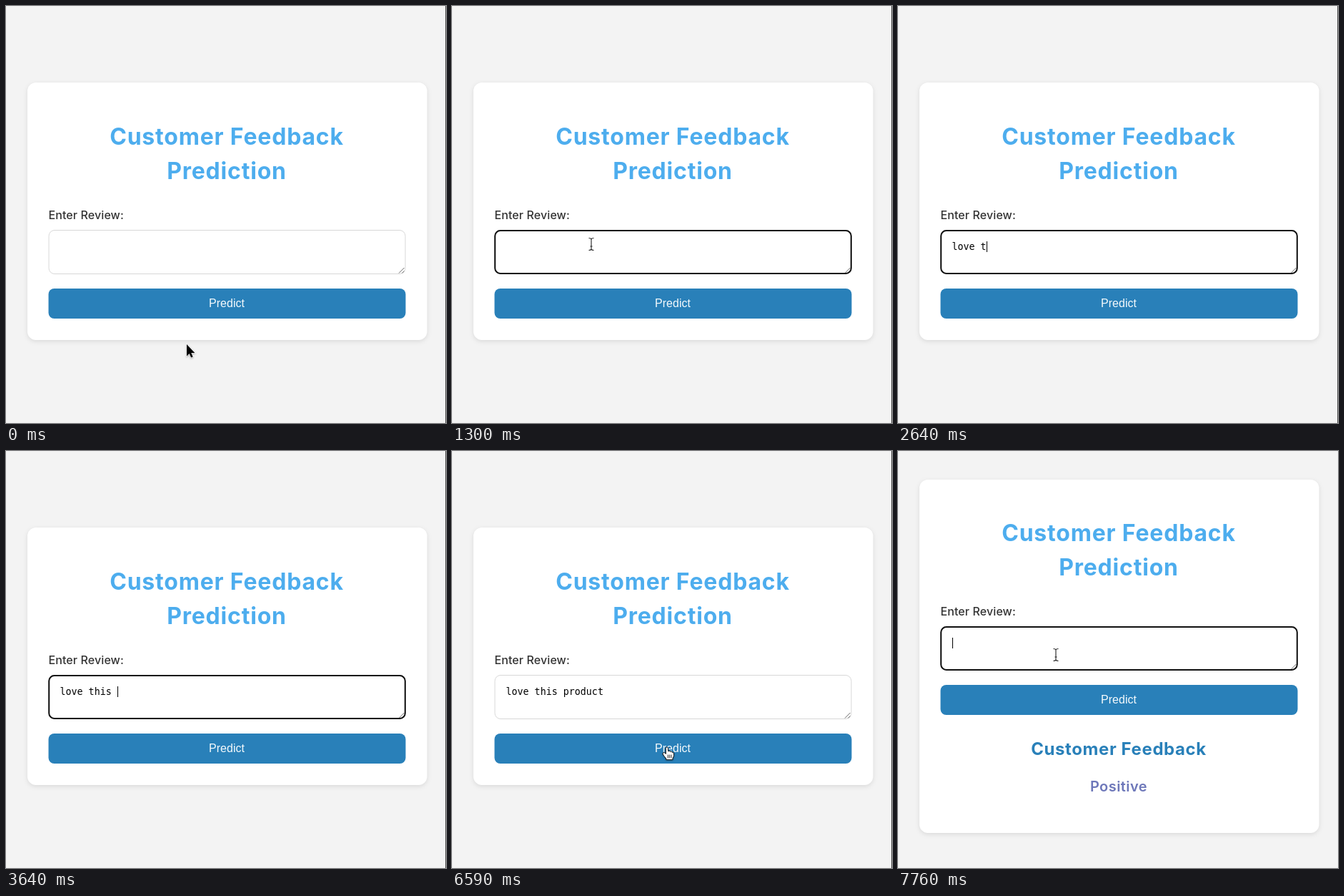
These frames come from a looping animation (616 px wide and 583 px high, 8000 ms). An HTML page:

```html
<!DOCTYPE html>
<html lang="en">
<head>
<meta charset="utf-8">
<title>Feedback form</title>
<style>
  html, body { margin: 0; width: 100%; height: 100%; overflow: hidden; background: #f3f3f3; }
  svg { display: block; width: 616px; height: 583px; }
  .head { font-family: Poppins, Inter, sans-serif; font-weight: 700; text-anchor: middle; }
  .title { font-size: 32px; letter-spacing: .8px; fill: #4dadee; }
  .sub { font-size: 24px; letter-spacing: .6px; fill: #2980b9; }
  .mood { font-size: 20px; font-weight: 600; letter-spacing: .45px; fill: #6d77b9; }
  .label { font: 500 16px Poppins, Inter, sans-serif; letter-spacing: .1px; fill: #333; }
  .btn { font: 16px "Liberation Sans", Arial, sans-serif; text-anchor: middle; fill: #f4f9fc; }
  .mono { font: 13.333px "DejaVu Sans Mono", monospace; fill: #000; white-space: pre; }
  #card { fill: #fff; filter: drop-shadow(0 2px 3px rgba(0, 0, 0, .1)); }
  .soft { filter: drop-shadow(0 1px 1px rgba(0, 0, 0, .3)); }
</style>
</head>
<body>
<svg viewBox="0 0 616 583">
  <rect width="616" height="583" fill="#f3f3f3"/>
  <rect id="edge" x="615" width="1" height="583" fill="#555"/>
  <rect id="card" x="30" y="107" width="559.5" height="360" rx="12"/>
  <g id="form">
    <text class="head title" x="309" y="194">Customer Feedback</text>
    <text class="head title" x="309" y="242">Prediction</text>
    <text class="label" x="59.5" y="298">Enter Review:</text>
    <rect id="field" x="60" y="313.5" width="499" height="61" rx="8" fill="#fff" stroke="#d8d8d8"/>
    <path d="M550 373.5l7.5-7.5M554.5 373.5l3-3" stroke="#666" fill="none"/>
    <rect id="ring" x="60.2" y="314" width="498.6" height="60" rx="7.5" fill="none" stroke="#101010" stroke-width="2"/>
    <text id="typed" class="mono" x="75.5" y="341"></text>
    <rect id="caret" y="329" width="1" height="15" fill="#000"/>
    <rect x="59.5" y="395" width="500" height="42" rx="8" fill="#2980b9"/>
    <text class="btn" x="309" y="421">Predict</text>
  </g>
  <g id="result">
    <text class="head sub" x="309" y="425">Customer Feedback</text>
    <text class="head mood" x="309" y="476">Positive</text>
  </g>
  <g id="mouse">
    <path id="arrow" class="soft" d="M0 0V16.4L3.7 12.9 6.1 18.6 8.7 17.5 6.3 11.9H11.4Z"
      fill="#000" stroke="#fff" stroke-width="1.2" paint-order="stroke"/>
    <g id="beam" fill="none">
      <path d="M-3.5-8.5Q-.5-8.5 0-7Q.5-8.5 3.5-8.5M0-7V7M-3.5 8.5Q-.5 8.5 0 7Q.5 8.5 3.5 8.5M-1.5 3H1.5" stroke="#fff" stroke-width="2.6"/>
      <path d="M-3.5-8.5Q-.5-8.5 0-7Q.5-8.5 3.5-8.5M0-7V7M-3.5 8.5Q-.5 8.5 0 7Q.5 8.5 3.5 8.5M-1.5 3H1.5" stroke="#222" stroke-width="1.1"/>
    </g>
    <g id="hand" class="soft" stroke="#111" stroke-linejoin="round" stroke-linecap="round">
      <path d="M-1.7 9V1.4Q-1.6 0 -.2 0Q1.2 0 1.4 1.4L1.8 5.8Q3.6 4.5 4.6 6.4Q6.2 5.4 7.1 7.2Q9.5 6.6 9.6 9V11.5Q9.2 14 8 15.5V17.7H-1.2V16Q-4.3 12.5 -5.8 10Q-6.5 8.2 -4.9 7.6Q-3.3 7.3 -1.7 9Z" fill="#fff"/>
      <path d="M1.4 11V15M3.7 11V15M6 11V15" fill="none" stroke-width=".9"/>
    </g>
  </g>
</svg>
<script>
const LOOP = 8000, LOAD = 6770, SHIFT = -68, CHAR = 8.027;
const REVIEW = 'love this product';
const keyTimes = [1550, 1790, 2040, 2140, 2290, 2640, 2950, 3130, 3460,
  3640, 4000, 4200, 4310, 4710, 4800, 4900, 5130];

// [time, cursor, x, y]
const moves = [
  [0, 'arrow', 253, 473], [110, 'arrow', 250, 464], [200, 'arrow', 240, 440],
  [290, 'hand', 226, 405], [390, 'beam', 208, 362], [480, 'beam', 198, 340],
  [570, 'beam', 195, 333], [2290, '', 195, 333],
  [6090, 'beam', 202, 338], [6190, 'beam', 236, 360], [6290, 'arrow', 274, 386],
  [6390, 'hand', 296, 409], [6480, 'hand', 301, 414],
  [LOAD, 'arrow', 301, 414], [6860, 'arrow', 296, 402], [6950, 'hand', 272, 352],
  [7050, 'beam', 240, 303], [7140, 'beam', 224, 288], [7280, 'beam', 221, 285]
];

// [time, focused, caret on]
const focus = [
  [0, 0, 0], [720, 1, 1], [1220, 1, 0], [1550, 1, 1], [5680, 1, 0],
  [6190, 1, 1], [6480, 0, 0], [7760, 1, 1]
];

const $ = id => document.getElementById(id);
const at = (table, t) => table.findLast(row => row[0] <= t);
const show = (id, on) => $(id).setAttribute('visibility', on ? 'inherit' : 'hidden');

function draw(t) {
  const loaded = t >= LOAD;
  const count = loaded ? 0 : keyTimes.filter(k => k <= t).length;
  const [, kind, x, y] = at(moves, t);
  const [, focused, caret] = at(focus, t);

  $('card').setAttribute('y', loaded ? 40 : 107);
  $('card').setAttribute('height', loaded ? 494 : 360);
  $('form').setAttribute('transform', `translate(0 ${loaded ? SHIFT : 0})`);
  show('edge', !loaded);
  show('result', loaded);

  $('typed').textContent = REVIEW.slice(0, count);
  $('caret').setAttribute('x', Math.round(75.5 + count * CHAR));
  show('caret', caret);
  show('ring', focused);

  $('mouse').setAttribute('transform', `translate(${x} ${y})`);
  for (const id of ['arrow', 'beam', 'hand']) show(id, id === kind);
}

const start = performance.now();
function tick() {
  draw((performance.now() - start) % LOOP);
  requestAnimationFrame(tick);
}
tick();
</script>
</body>
</html>
```
